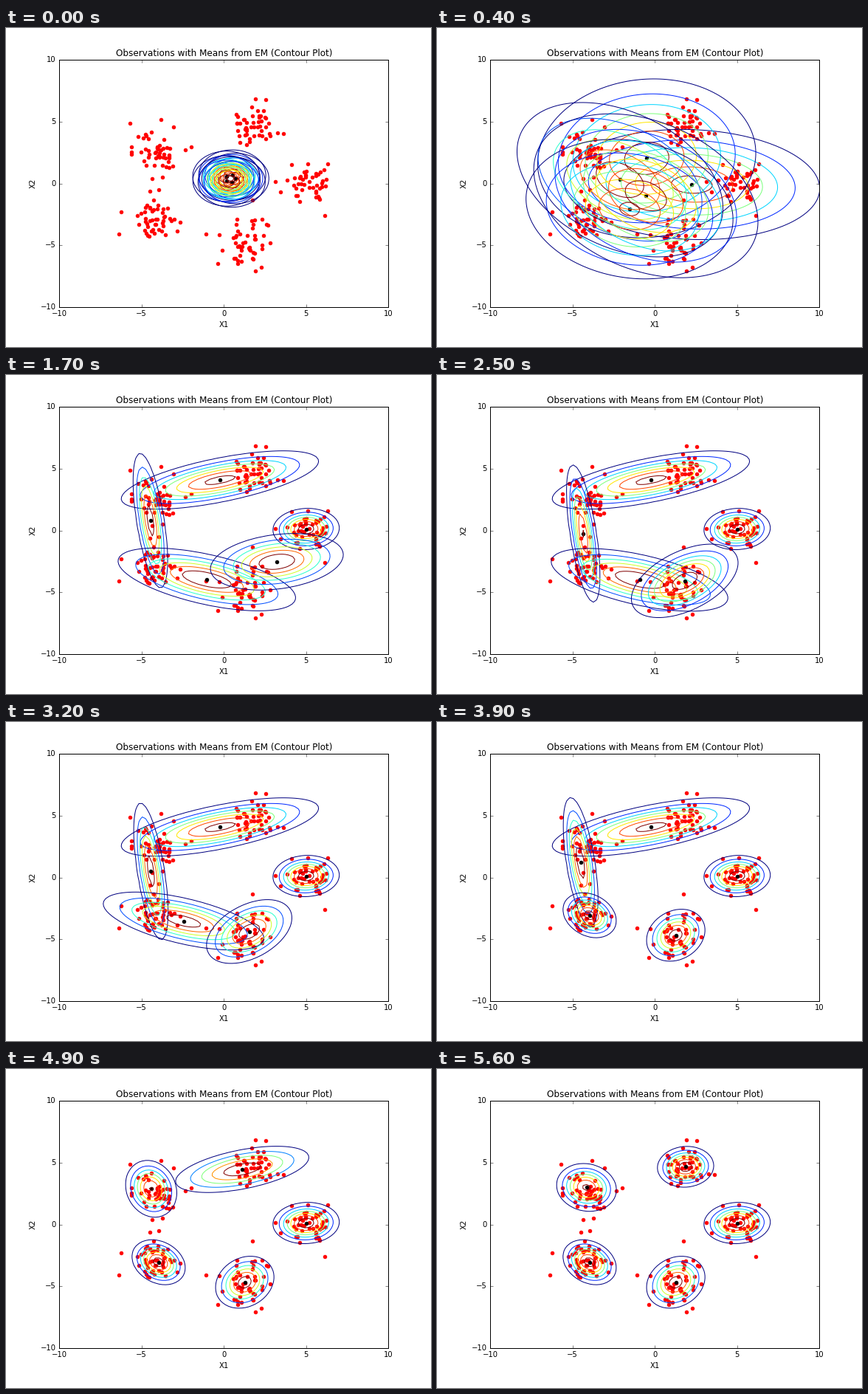
Recreate the animation shown at these times as a matplotlib script. Size 576 px wide and 432 px high, loop 6.6 s.

```python
import math

import numpy as np
import matplotlib.pyplot as plt
from matplotlib.animation import FuncAnimation

plt.style.use("classic")
plt.rcParams.update({
    "font.family": "DejaVu Sans",
    "font.size": 10,
    "text.kerning_factor": 6,
    "figure.facecolor": "white",
    "savefig.dpi": "figure",
})

STEP_MS = 100
FRAMES = 66          # the last state is held for one second
LAST = 56
NICE = (1, 1.5, 2, 2.5, 3, 4, 5, 6, 8, 10)


def blob(mx, my, sx, sy, rho=0.0):
    c = rho * sx * sy
    return np.array([mx, my]), np.array([[sx * sx, c], [c, sy * sy]])


# The five clusters, then groupings that the fit passes through.
BLOBS = {
    "right": blob(5.0, 0.12, 0.99, 0.82, 0.05),
    "top": blob(1.87, 4.67, 0.84, 0.81, 0.05),
    "upper": blob(-4.15, 3.0, 0.91, 0.97, -0.1),
    "lower": blob(-3.96, -3.05, 0.80, 0.90, -0.25),
    "bottom": blob(1.27, -4.67, 0.91, 1.08, 0.2),
    "edge_hi": blob(-4.7, 3.0, 0.5, 0.75, -0.3),
    "edge_lo": blob(-4.1, -2.5, 0.35, 0.75, -0.3),
    "gap": blob(3.22, -2.53, 2.05, 1.16, 0.25),
    "wide": blob(-0.88, -0.31, 3.57, 3.12, -0.25),
}
NAMES = list(BLOBS)
CLUSTERS = NAMES[:5]
MEANS = np.array([m for m, _ in BLOBS.values()])
COVS = np.array([c for _, c in BLOBS.values()])

# Share of each blob that a component covers at key steps.
PATHS = {
    "right": {9: dict(right=1)},
    "top": {9: dict(upper=0.475, top=0.525),
            17: dict(upper=0.35, top=0.65),
            39: dict(upper=0.35, top=0.65),
            49: dict(upper=0.125, top=0.875)},
    "upper": {9: dict(upper=0.42, lower=0.25, bottom=0.1, wide=0.23),
              17: dict(edge_hi=0.6, edge_lo=0.4),
              25: dict(edge_hi=0.41, edge_lo=0.59),
              39: dict(edge_hi=0.68, edge_lo=0.32),
              49: dict(upper=0.5, edge_hi=0.48, edge_lo=0.02)},
    "lower": {9: dict(lower=0.5, bottom=0.5),
              17: dict(lower=0.44, bottom=0.56),
              25: dict(lower=0.42, bottom=0.58),
              39: dict(lower=1)},
    "bottom": {9: dict(wide=1),
               17: dict(gap=1),
               25: dict(gap=0.28, bottom=0.72),
               39: dict(bottom=1)},
}
for name, path in PATHS.items():
    path[1] = {"wide": 0.75, name: 0.25}
    path[LAST] = {name: 1}


def fit(name, step):
    """Mean and covariance of one component after a number of steps."""
    if step == 0:
        return 0.4 + 0.06 * BLOBS[name][0], np.eye(2)
    path = PATHS[name]
    keys = sorted(path)
    w = np.array([np.interp(step, keys, [path[k].get(b, 0) for k in keys])
                  for b in NAMES])
    mean = w @ MEANS
    d = MEANS - mean
    cov = np.tensordot(w, COVS, 1) + (w[:, None] * d).T @ d
    return mean, cov


axis = np.linspace(-10, 10, 100)
X, Y = np.meshgrid(axis, axis)


def density(mean, cov):
    d = np.stack([X - mean[0], Y - mean[1]], axis=-1)
    q = np.einsum("...i,ij,...j", d, np.linalg.inv(cov), d)
    return np.exp(-q / 2) / (2 * np.pi * math.sqrt(np.linalg.det(cov)))


def nice_levels(peak):
    """At most seven evenly spaced round levels below the peak."""
    raw = peak / 8
    scale = 10.0 ** math.floor(math.log10(raw))
    step = next(s for s in NICE if s * scale >= raw) * scale
    levels = step * np.arange(1, 8)
    return levels[levels < peak]


def scatter_points(count=46, reach=2.0):
    rng = np.random.default_rng(12)
    pts = []
    for name in CLUSTERS:
        mean, cov = BLOBS[name]
        root = np.linalg.cholesky(cov)
        z = rng.normal(size=(4 * count, 2))
        z = z[np.hypot(z[:, 0], z[:, 1]) < reach][:count]
        pts.append(mean + z @ root.T)
    strays = [(-5.7, 4.9), (-3.8, 5.2), (-3.05, 4.6), (-2.0, 2.95),
              (-4.35, 0.4), (-3.75, 0.5), (-4.5, -0.6), (-3.95, -0.5),
              (-6.23, -2.3), (-6.37, -4.1), (-1.08, -4.1), (1.75, -1.35),
              (-0.37, -6.5), (1.92, -7.08), (2.28, -6.8), (6.13, -2.6),
              (6.32, 1.6), (1.92, 6.85), (2.55, 6.78), (3.62, 4.05)]
    return np.vstack(pts + [strays])


fig = plt.figure(figsize=(8, 6), dpi=72)
ax = fig.add_axes([0.125, 0.125, 0.775, 0.775])
ax.scatter(*scatter_points().T, s=20, color="red")
dots = ax.scatter([0] * 5, [0] * 5, s=20, color="black")
ax.set(xlim=(-10, 10), ylim=(-10, 10), xlabel="X1", ylabel="X2",
       title="Observations with Means from EM (Contour Plot)")
ax.set_xticks(range(-10, 11, 5))
ax.set_yticks(range(-10, 11, 5))

rings = []


def draw(i):
    while rings:
        rings.pop().remove()
    centers = []
    for name in CLUSTERS:
        mean, cov = fit(name, min(i, LAST))
        z = density(mean, cov)
        rings.append(ax.contour(X, Y, z, levels=nice_levels(z.max()),
                                cmap="jet", linewidths=1))
        centers.append(mean)
    dots.set_offsets(centers)
    return [dots]


anim = FuncAnimation(fig, draw, frames=FRAMES, interval=STEP_MS,
                     init_func=lambda: draw(0), repeat=True, repeat_delay=0)
plt.show()
```
